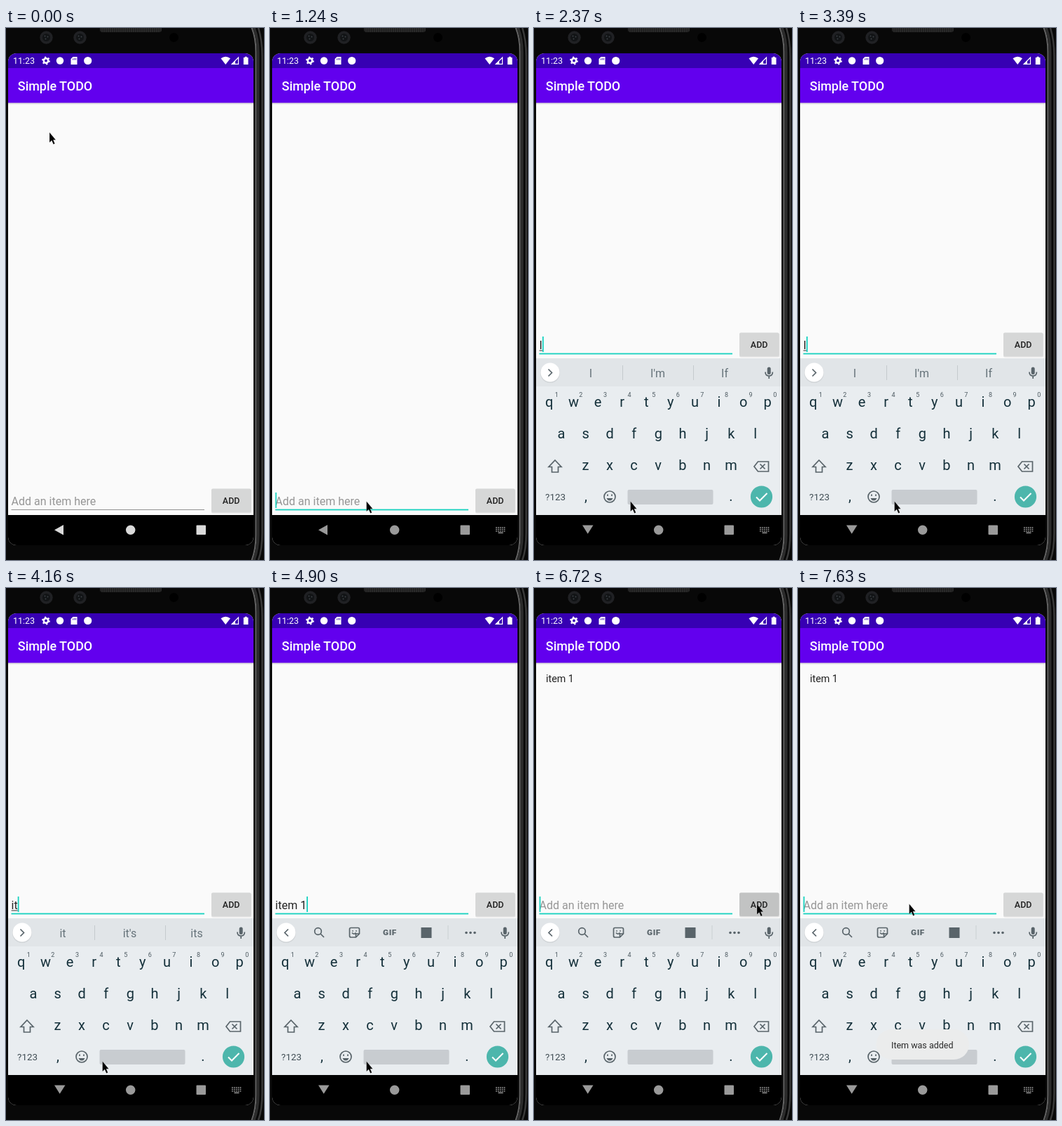
Recreate the animation shown at these times as an HTML page. Size 368 by 757 pixels, loop 8000 ms.

```html
<!DOCTYPE html>
<html lang="en">
<head>
<meta charset="utf-8">
<title>Simple TODO</title>
<style>
  html, body { margin: 0; width: 100%; height: 100%; overflow: hidden; background: #070707; }
  svg { display: block; width: 368px; height: 757px; font-family: Roboto, sans-serif; }
  .mid { text-anchor: middle; }
  .icon { fill: none; stroke: #59646a; stroke-width: 1.7; }
  .key { font-size: 20px; fill: #14303a; text-anchor: middle; }
  #typed { white-space: pre; }
</style>
</head>
<body>
<svg id="stage" viewBox="0 0 368 757" xmlns="http://www.w3.org/2000/svg">
  <defs>
    <clipPath id="screen"><rect x="3" y="36" width="350" height="700" rx="12"/></clipPath>
    <clipPath id="panel"><rect x="3" y="433" width="350" height="260"/></clipPath>
    <linearGradient id="drop" x2="0" y2="1">
      <stop stop-color="#000" stop-opacity=".16"/><stop offset="1" stop-color="#000" stop-opacity="0"/>
    </linearGradient>
    <pattern id="mesh" width="3" height="3" patternUnits="userSpaceOnUse">
      <rect width="3" height="3" fill="#292929"/><rect width="1" height="3" fill="#1b1b1b"/>
    </pattern>
  </defs>

  <!-- Phone body -->
  <rect width="368" height="757" fill="#080808"/>
  <g fill="none">
    <path d="M349-4Q356.500 12 356.500 34V722Q356.500 744 349 761" stroke="#666" stroke-width="2"/>
    <path d="M352-4Q359.500 12 359.500 34V722Q359.500 744 352 761" stroke="#2c2c2c" stroke-width="4"/>
    <path d="M360 0Q365.500 18 365.500 40V718Q365.500 742 360 757" stroke="#3a3a3a" stroke-width="2.500"/>
  </g>
  <path d="M134 0H222V3Q222 6 218 6H138Q134 6 134 3Z" fill="url(#mesh)"/>
  <g id="lenses"></g>
  <circle cx="239.500" cy="13.500" r="6.500" fill="#000"/>

  <g clip-path="url(#screen)">
    <rect x="3" y="36" width="350" height="700" fill="#fafafa"/>
    <rect x="3" y="36" width="350" height="21" fill="#3700b3"/>
    <rect x="3" y="57" width="350" height="49.500" fill="#6200ee"/>
    <rect x="3" y="106.500" width="350" height="3" fill="url(#drop)"/>

    <!-- Status bar -->
    <g fill="#fff">
      <text x="10" y="51" font-size="12.500">11:23</text>
      <circle cx="57" cy="46.500" r="3.200" fill="none" stroke="#fff" stroke-width="2.600"/>
      <circle cx="57" cy="46.500" r="5" fill="none" stroke="#fff" stroke-width="1.800" stroke-dasharray="2.200 3.036"/>
      <circle cx="77" cy="46.500" r="5.200"/>
      <path d="M95.500 41H101.500V52H92.500V44Z"/>
      <path d="M95.500 43.500v2M97.500 43v2.500M99.500 43v2.500" stroke="#3700b3" stroke-width=".9"/>
      <circle cx="116.700" cy="46.500" r="5.600"/>
      <path d="M306.500 43.300Q313.200 38.300 320 43.300L313.200 52Z"/>
      <path d="M331.500 42V51.300H322.200Z" fill="none" stroke="#fff" stroke-width="1.200"/>
      <path d="M327 46.500V51.500H322Z"/>
      <path d="M338.800 42H340.600V40.700H343.600V42H345.500V52H338.800Z"/>
    </g>
    <text x="16.800" y="89" font-size="17.950" font-weight="500" fill="#fff">Simple TODO</text>
    <text id="entry" x="17" y="134" font-size="14.260" fill="#222">item 1</text>

    <!-- Input row -->
    <g id="row">
      <text id="hint" x="7.600" y="678.700" font-size="16" fill="#969696">Add an item here</text>
      <text id="typed" x="7.600" y="678.700" font-size="16" fill="#222"></text>
      <rect id="composing" x="7.600" y="680.500" height="1" fill="#333"/>
      <rect id="underline" x="7.500" width="275.500"/>
      <rect id="caret" y="661" width="1.800" height="22" fill="#16d1bf"/>
      <rect x="293" y="656.500" width="57" height="34" rx="2" fill="#000" opacity=".1"/>
      <rect id="button" x="293" y="655.500" width="56.500" height="33.500" rx="2"/>
      <text class="mid" x="321.200" y="676.500" font-size="12.500" font-weight="500" fill="#222">ADD</text>
    </g>

    <!-- Keyboard -->
    <g clip-path="url(#panel)">
      <g id="keyboard">
        <rect x="3" y="470" width="350" height="230" fill="#e9edf0"/>
        <rect x="3" y="470" width="350" height="40" fill="#e1e5e8"/>
        <circle cx="23" cy="491" r="14" fill="#000" opacity=".08"/>
        <circle cx="23" cy="490" r="13.500" fill="#fff"/>
        <path id="chevron" class="icon"/>
        <g id="tools">
          <circle class="icon" cx="68.500" cy="488.500" r="4.800"/>
          <path class="icon" d="M72 492L77 497" stroke-width="2"/>
          <path class="icon" d="M115.500 483.500H125.500Q127.500 483.500 127.500 485.500V492L122.500 497H115.500Q113.500 497 113.500 495V485.500Q113.500 483.500 115.500 483.500ZM127.500 492H122.500V497M117 490.500Q120 494 122.500 490.500M118 487.200v1.500M123 487.200v1.500" stroke-width="1.500"/>
          <text class="mid" x="171" y="494" font-size="11.800" font-weight="900" letter-spacing=".6" fill="#59646a">GIF</text>
          <rect x="215.500" y="483" width="15" height="15" fill="#59646a"/>
          <path d="M254 480V500" stroke="#cbd0d3"/>
          <g fill="#59646a"><circle cx="280" cy="490.500" r="1.800"/><circle cx="286" cy="490.500" r="1.800"/><circle cx="292" cy="490.500" r="1.800"/></g>
        </g>
        <g id="words" font-size="16" fill="#66737a">
          <path d="M126.500 480V501M227.500 480V501" stroke="#c4cacd"/>
          <text class="mid" x="81" y="496.500"></text>
          <text class="mid" x="176.500" y="496.500"></text>
          <text class="mid" x="272" y="496.500"></text>
        </g>
        <rect x="332.700" y="482.500" width="5" height="10.500" rx="2.500" fill="#59646a"/>
        <path class="icon" d="M330 489.500Q330 495 335.200 495T340.400 489.500M335.200 495V499" stroke-width="1.500"/>
        <g id="keys"></g>
        <path id="shift" class="icon" d="M30 615L39 624.500H34.500V632H25.500V624.500H21Z"/>
        <path class="icon" d="M319.500 617H334.500V631H319.500L314 624ZM322.500 620.500L329.500 627.500M329.500 620.500L322.500 627.500"/>
        <text class="mid" x="30.500" y="672" font-size="13.400" fill="#3f4c53">?123</text>
        <text class="key" x="74" y="673">,</text>
        <text class="key" x="281" y="673">.</text>
        <circle class="icon" cx="108" cy="667" r="8"/>
        <path d="M103.500 669H112.500Q111 672.500 108 672.500T103.500 669Z" fill="#59646a"/>
        <path class="icon" d="M105 663.500v2.400M111 663.500v2.400"/>
        <rect x="133.500" y="657" width="122" height="21" rx="2" fill="#c8ccd0"/>
        <circle cx="324.500" cy="667" r="15.600" fill="#4db6ac"/>
        <path d="M317 667.500L322 672.500L332.500 662" fill="none" stroke="#fff" stroke-width="2"/>
      </g>
    </g>

    <!-- Navigation bar -->
    <rect x="3" y="693" width="350" height="43" fill="#000"/>
    <g id="nav">
      <path id="back"/>
      <circle cx="177.700" cy="714.200" r="6.700"/>
      <rect x="271.500" y="707.500" width="13.500" height="13.500" rx="1"/>
    </g>
    <g id="switcher" fill="#9a9a9a"></g>

    <g id="toast">
      <rect x="111.500" y="628" width="132.500" height="43" rx="21.500" fill="#ebecec"/>
      <text x="133" y="654.800" font-size="12.500" fill="#2b2b2b">Item was added</text>
    </g>
  </g>
  <path id="pointer" d="M0 0V14.500L3.200 11.500L5.600 17L7.700 16L5.400 10.700H9Z" fill="#000" stroke="#fff" stroke-width=".4" stroke-opacity=".5"/>
</svg>
<script>
const LOOP = 8000;
const TEXT_X = 7.6;
const $ = id => document.getElementById(id);
const set = (el, attrs) => { for (const k in attrs) el.setAttribute(k, attrs[k]); };
const show = (id, on) => $(id).setAttribute("display", on ? "inline" : "none");
const add = (parent, tag, attrs, text = "") => {
  const el = document.createElementNS("http://www.w3.org/2000/svg", tag);
  set(el, attrs);
  el.textContent = text;
  return parent.appendChild(el);
};

for (const cx of [57.5, 105.5]) {
  add($("lenses"), "circle", { cx, cy: 13.5, r: 9.2, fill: "#202124" });
  add($("lenses"), "circle", { cx, cy: 13.5, r: 5.5, fill: "#121416" });
  for (const [dx, dy] of [[-2, -2], [2, -1], [-1, 2]])
    add($("lenses"), "circle", { cx: cx + dx, cy: 13.5 + dy, r: 1, fill: "#3b4145" });
}

const letters = [];
[["qwertyuiop", 21.8, 539.2], ["asdfghjkl", 39, 583.9], ["zxcvbnm", 73.4, 629]].forEach(([row, x0, y], r) =>
  [...row].forEach((ch, i) => {
    const x = x0 + i * 34.6;
    letters.push({ ch, el: add($("keys"), "text", { class: "key", x, y }) });
    if (!r) add($("keys"), "text", { class: "mid", x: x + 10.5, y: 525, "font-size": 9, fill: "#4c5960" }, (i + 1) % 10);
  }));

for (let r = 0; r < 3; r++)
  for (let c = 0; c < 5; c++)
    add($("switcher"), "rect", { x: 322 + c * 2.9, y: 710 + r * 2.6, width: 1.7, height: 1.5 });
add($("switcher"), "rect", { x: 325.5, y: 717.6, width: 7, height: 1.5 });

// time, text, caret visible, suggestions (empty shows the toolbar)
const edits = [
  [0, "", 0, ""], [990, "", 1, ""], [1600, "", 0, ""], [2130, "", 1, ""],
  [2370, "I", 1, "I|I'm|If"], [2650, "It", 1, "It|It's|Its"],
  [3270, "It", 0, "It|It's|Its"], [3390, "I", 1, "I|I'm|If"],
  [3640, "", 1, "I|The|I'm"], [3790, "i", 1, "I|I'm|if"],
  [4160, "it", 1, "it|it's|its"], [4280, "ite", 1, "ite|item|items"],
  [4400, "item", 1, "item|items|itemized"], [4650, "item ", 1, "is|in|on"],
  [4900, "item 1", 1, ""], [5140, "item 1 ", 1, "and|for|to"],
  [5570, "item 1 ", 0, "and|for|to"], [6110, "item 1 ", 1, "and|for|to"],
  [6600, "item 1 ", 0, "and|for|to"], [6720, "", 1, ""],
  [7200, "", 0, ""], [7630, "", 1, ""]
];

// start time, steps, from, to; the pointer advances once per 120 ms
const moves = [
  [0, 7, [62, 148.5], [137.6, 673.6]],
  [6110, 2, [356, 464], [318, 450]],
  [6720, 5, [318, 450], [158.6, 449.5]]
];

const last = (list, t) => list.filter(e => e[0] <= t).pop();
const ease = p => p * p * (3 - 2 * p);

function drawInput(t) {
  const [, text, caret, strip] = last(edits, t);
  const focused = t >= 990;
  const typed = $("typed");
  typed.textContent = text;
  const width = text ? typed.getComputedTextLength() : 0;
  show("hint", !text);
  set($("composing"), { width: /^[a-z]+$/i.test(text) ? width : 0 });
  set($("caret"), { x: TEXT_X + width });
  show("caret", caret);
  set($("underline"), focused
    ? { y: 684.6, height: 1.8, fill: "#16d1bf" }
    : { y: 685, height: 1, fill: "#909090" });
  set($("button"), { fill: t >= 6600 && t < 6840 ? "#c2c3c3" : "#d6d7d7" });
  set($("row"), { transform: `translate(0 ${t >= 1360 ? -222 : 0})` });

  show("tools", !strip);
  show("words", strip);
  const words = strip.split("|");
  $("words").querySelectorAll("text").forEach((el, i) => el.textContent = words[i] || "");
  set($("chevron"), { d: strip ? "M20.500 485.500L25.500 490.500L20.500 495.500" : "M26 485.500L21 490.500L26 495.500" });
}

function drawKeyboard(t) {
  const caps = t >= 2130 && t < 2370;
  show("keyboard", t >= 1360);
  set($("keyboard"), { transform: `translate(0 ${t < 1480 ? 90 : 0})` });
  for (const { ch, el } of letters) el.textContent = caps ? ch.toUpperCase() : ch;
  $("shift").style.fill = caps ? "#59646a" : "none";
  set($("nav"), { fill: t < 840 ? "#dadada" : "#9a9a9a" });
  set($("back"), { d: t < 1360 ? "M69 714.300L82 707V721.500Z" : "M69 707.500H84.500L76.700 719.700Z" });
  show("switcher", t >= 1240);
}

function drawPointer(t) {
  const [start, steps, from, to] = last(moves, t);
  const p = ease(Math.min(1, Math.floor((t - start) / 120) / steps));
  const [x, y] = from.map((v, i) => v + (to[i] - v) * p);
  set($("pointer"), { transform: `translate(${x} ${y})` });
  show("pointer", t < 5720 || t >= 6110);
}

function render(t) {
  drawInput(t);
  drawKeyboard(t);
  drawPointer(t);
  show("entry", t >= 6720);
  set($("toast"), { opacity: Math.max(0, Math.min(1, Math.floor((t - 6720) / 120) / 2)) });
}

const begin = performance.now();
function tick() {
  render((performance.now() - begin) % LOOP);
  requestAnimationFrame(tick);
}
tick();
</script>
</body>
</html>
```
